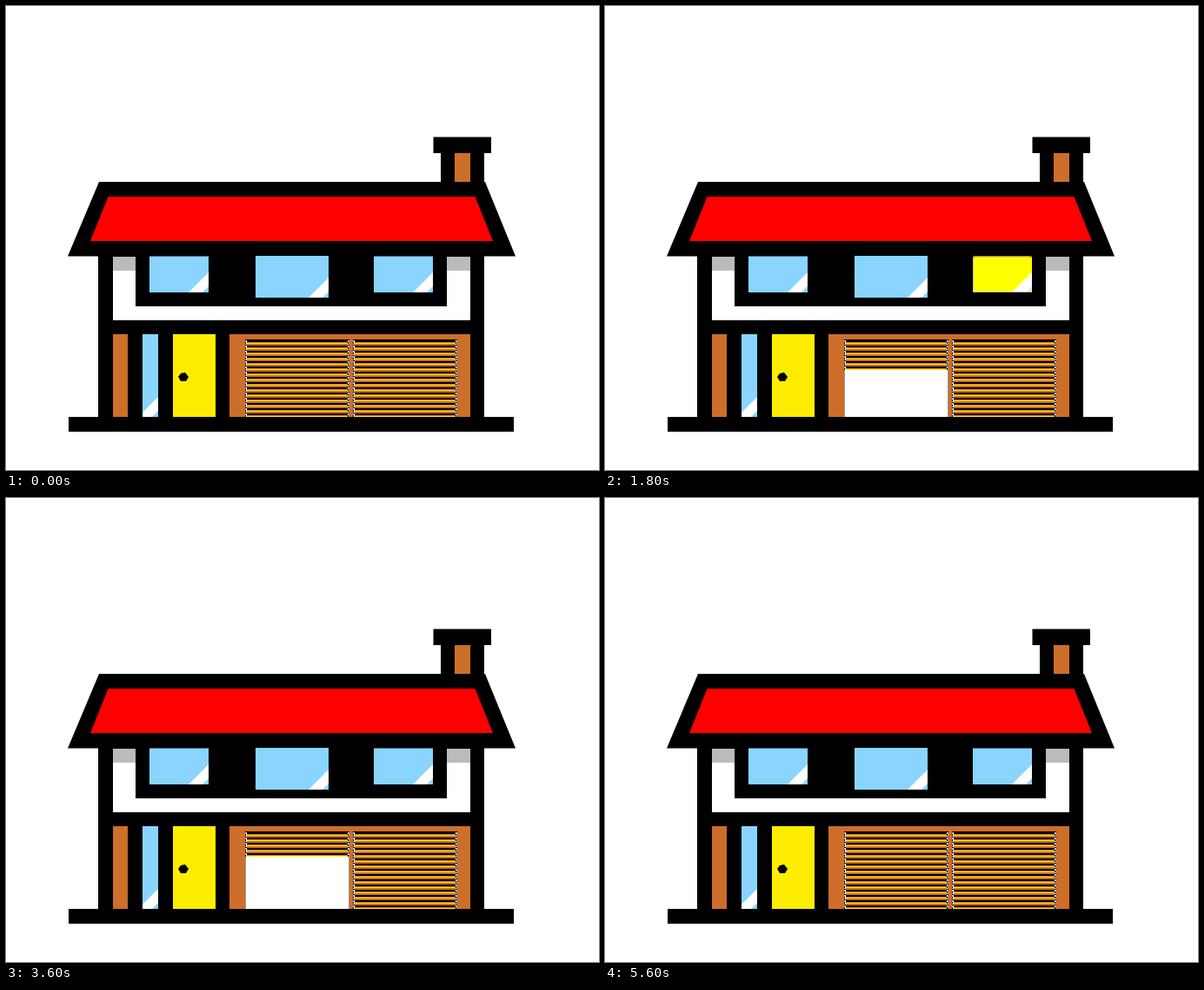
These frames come from a looping animation (682 by 533 pixels, 5.8 s). An HTML page with a canvas:

```html
<!DOCTYPE html>
<html>
<head>
<meta charset="utf-8">
<style>
  html, body { margin: 0; width: 100%; height: 100%; overflow: hidden; background: #fff; }
  canvas { display: block; }
</style>
</head>
<body>
<canvas id="stage" width="682" height="533"></canvas>
<script>
const ctx = document.getElementById('stage').getContext('2d');
const STEP = 200, STEPS = 29, TURN = 14;
const BRICK = '#cd6e2a', GLASS = '#89d5ff', SHADE = '#bbb', YELLOW = '#ffed00';

// Each window: edges, then the step ranges in which its light is on
const windows = [
  { x: 165, r: 233, b: 329, lit: [[4, 7], [20, 24]] },
  { x: 287, r: 371, b: 335, lit: [[12, 16], [20, 24]] },
  { x: 423, r: 491, b: 329, lit: [[8, 11], [20, 24]] }
];

// Filled box from left, top to right, bottom
function box(color, l, t, r, b) {
  ctx.fillStyle = color;
  ctx.fillRect(l, t, r - l, b - t);
}

function poly(color, ...pts) {
  ctx.fillStyle = color;
  ctx.beginPath();
  for (let i = 0; i < pts.length; i += 2) ctx.lineTo(pts[i], pts[i + 1]);
  ctx.fill();
}

function drawWindow({ x, r, b, lit }, step) {
  const on = lit.some(([from, to]) => step >= from && step <= to);
  const top = b > 330 ? 287 : 287.5;
  box(on ? '#ff0' : GLASS, x, top, r, b);
  poly('#fff', r - 23, b, r, b - 23, r, b - 7, r - 7, b);
  if (!on) return;
  poly('#f3e6c4', r - 7, b, r, b - 7, r, b);
  box(SHADE, x, top, x + 1, b);
  box('#d8a070', x, top, r, top + 1);
  box(b > 330 ? '#f00' : SHADE, x, b - 1, r, b);
  box('#f00', x, top, x + 2, top + 1);
  box('#f00', r - 2, top, r, top + 1);
}

function drawShutter(l, r, bottom) {
  const top = 383;
  box('#fff', l, top, r, 472);
  box('#999', l, top, l + 1, 472);
  box('#999', r - 1, top, r, 472);
  ctx.save();
  ctx.beginPath();
  ctx.rect(l, top, r - l, bottom - top);
  ctx.clip();
  for (let y = 382; y < bottom; y += 6) {
    box(BRICK, l + 2, y, r - 2, y + 5);
    box('#000', l + 2, y + 2, r - 2, y + 4);
    box(YELLOW, l + 2, y + 5, r - 2, y + 6);
    for (const x of [l, r - 2]) {
      box('#000', x, y + 1, x + 2, y + 2);
      box('#000', x, y + 4, x + 1, y + 6);
    }
  }
  box('#000', l + 1, top, r - 1, top + 1);
  ctx.restore();
}

function drawHouse() {
  box('#fff', 0, 0, 682, 533);

  // Chimney and roof
  box('#000', 491.5, 150.5, 558, 169);
  box('#000', 500, 169, 550, 203);
  box(BRICK, 516, 169, 534, 202);
  poly('#000', 107, 202, 551, 202, 586, 287.5, 71, 287.5);
  poly('#f00', 117.5, 219, 539.5, 219, 560, 270, 97, 270);

  // Upper floor
  box('#000', 106, 287, 550, 472);
  box('#fff', 123, 288, 534, 361);
  box(SHADE, 123, 288, 534, 304);
  box('#000', 149, 287, 507, 345);

  // Ground floor
  box(BRICK, 123, 377, 140, 472);
  box(GLASS, 157, 377, 175, 472);
  poly('#fff', 157, 467, 175, 449, 175, 465, 168, 472, 157, 472);
  box(YELLOW, 192, 377, 241, 472);
  poly('#000', 198, 426, 201, 422, 206, 421, 210, 426, 207, 431, 201, 431);
  box(BRICK, 257, 377, 534, 472);
  box('#000', 72, 472, 584, 489);
}

function frame(now) {
  const step = Math.floor(now / STEP) % STEPS;
  drawHouse();
  windows.forEach(w => drawWindow(w, step));
  drawShutter(275, 395, 388 + 6 * Math.abs(step - TURN));
  drawShutter(399, 519, 472);
  requestAnimationFrame(frame);
}
frame(performance.now());
</script>
</body>
</html>
```
